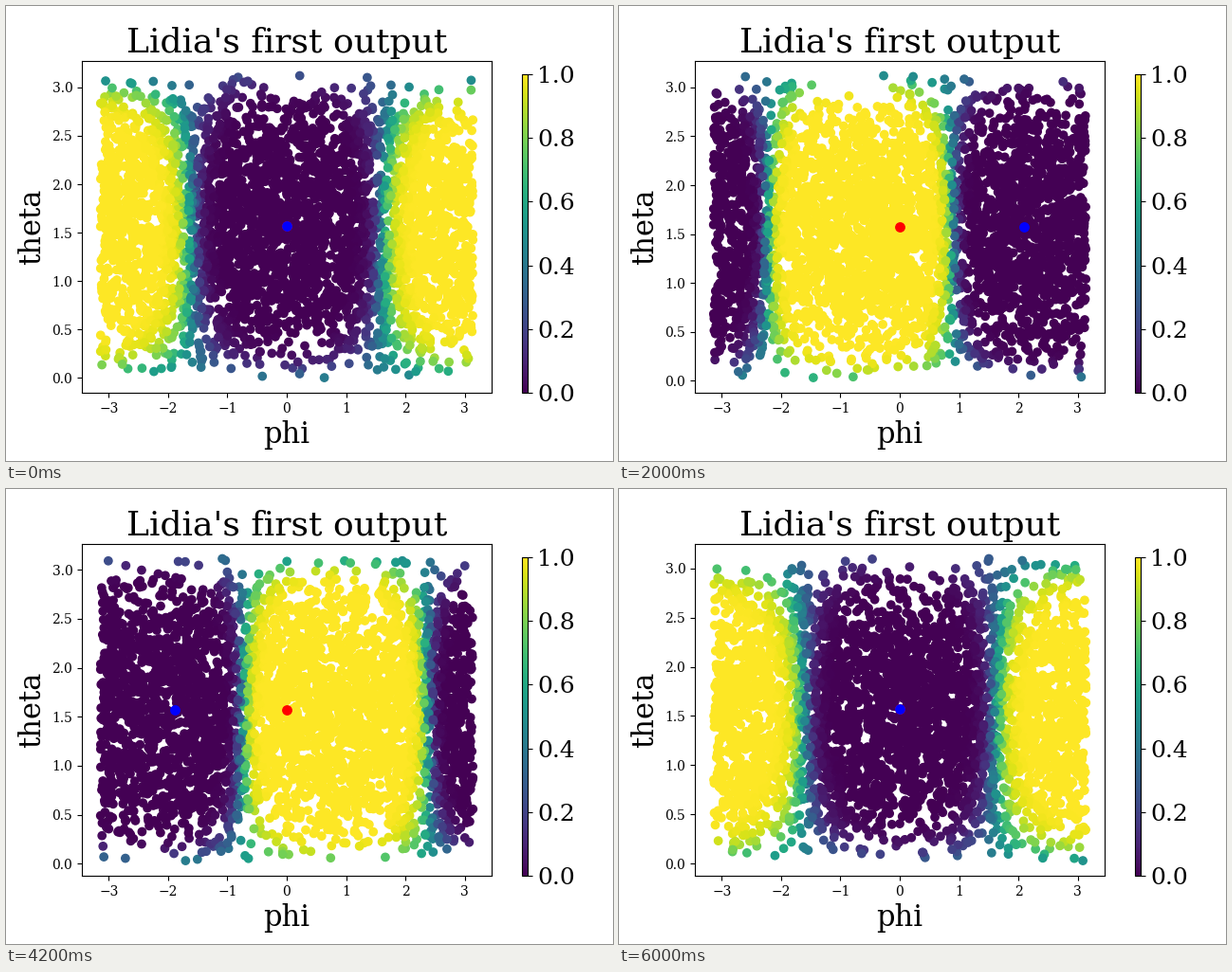
A matplotlib script for the animation above (6.2 s loop, 640 by 480 pixels).

```python
import numpy as np
import matplotlib.pyplot as plt
from matplotlib.animation import FuncAnimation

FRAMES = 31
POINTS = 4000
EQUATOR = np.pi / 2
plt.rcParams["font.family"] = "DejaVu Serif"


def sample_sphere(step):
    """Uniform points on the sphere as (phi, theta)."""
    rng = np.random.default_rng(step)
    phi = rng.uniform(-np.pi, np.pi, POINTS)
    theta = np.arccos(rng.uniform(-1, 1, POINTS))
    return phi, theta


def response(phi, theta, angle):
    """Smooth hemisphere facing away from blue - 0.58 * red."""
    axis = np.arctan2(np.sin(angle), np.cos(angle) - 0.58)
    near = max(0, np.cos(angle)) ** 4
    gain = 19 - 6.5 * near
    bias = -0.15 - 0.45 * near + 0.3 * np.cos(theta)
    logit = bias - gain * np.sin(theta) * np.cos(phi - axis)
    return 1 / (1 + np.exp(-logit))


fig, ax = plt.subplots(figsize=(6.4, 4.8), dpi=100)
fig.subplots_adjust(left=0.125, right=0.8, bottom=0.15, top=0.88)
blank = np.zeros(POINTS)
cloud = ax.scatter(blank, blank, c=blank, cmap="viridis", vmin=0, vmax=1)
red = ax.scatter([0], [EQUATOR], s=46, color="red")
blue = ax.scatter([0], [EQUATOR], s=46, color="blue")
ax.set_xlim(-1.1 * np.pi, 1.1 * np.pi)
ax.set_title("Lidia's first output", fontsize=26)
ax.set_xlabel("phi", fontsize=22)
ax.set_ylabel("theta", fontsize=22)

bar = fig.colorbar(cloud, cax=fig.add_axes([0.85, 0.15, 0.01, 0.7]))
bar.ax.tick_params(labelsize=18)


def update(step):
    angle = 2 * np.pi * step / (FRAMES - 1)
    phi, theta = sample_sphere(step)
    cloud.set_offsets(np.column_stack([phi, theta]))
    cloud.set_array(response(phi, theta, angle))
    wrapped = (angle + np.pi) % (2 * np.pi) - np.pi
    blue.set_offsets([[wrapped, EQUATOR]])
    margin = 0.05 * np.ptp(theta)
    ax.set_ylim(theta.min() - margin, theta.max() + margin)
    return cloud, red, blue


anim = FuncAnimation(fig, update, frames=FRAMES, interval=200, repeat=True)
plt.show()
```
